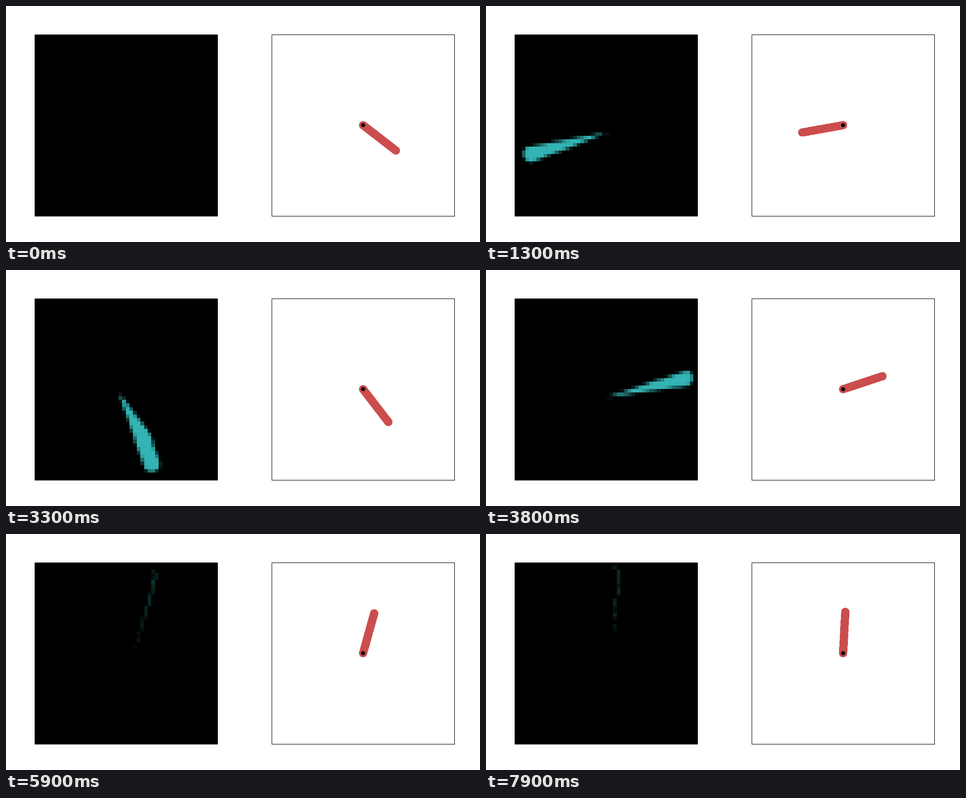
Write an HTML page with a canvas that moves like this. It is 960 by 480 pixels and loops after 8000 ms.

```html
<!DOCTYPE html>
<html lang="en">
<head>
<meta charset="utf-8">
<title>Pendulum swing-up</title>
<style>
html, body { margin: 0; width: 100%; height: 100%; overflow: hidden; background: #fff; }
canvas { display: block; }
</style>
</head>
<body>
<canvas id="stage" width="960" height="480"></canvas>
<script>
const ctx = document.getElementById('stage').getContext('2d');

const STEP = 100, STEPS = 80;
const SIZE = 260;              // simulated view, cropped around the pivot
const UNIT = 500 / 4.4;        // rod length in view pixels
const RADIUS = UNIT * 0.1;
const CELLS = 50, CELL = 7.392, SUB = 5;
const PANEL = CELLS * CELL, TOP = 57.6;
const LEFT = 58.4, RIGHT = 538.4;
const ZOOM = PANEL / 500;

// step, angle from upright (counter-clockwise degrees), degrees per step
const KEYS = [
  [0, 232.2, -0.6], [4, 213.3, -9], [8, 164.7, -14], [13, 100.2, -10.4],
  [17, 70.2, -4.4], [21, 65.8, 2.4], [25, 90.3, 9.9], [29, 145, 17],
  [33, 217.5, 18.4], [36, 265.5, 13.3], [40, 304.8, 6.9], [45, 327.5, 2.8],
  [54, 340.3, 0.95], [63, 347.2, 0.62], [79, 356.95, 0.5]
];

function angleAt(step) {
  let k = 0;
  while (k < KEYS.length - 2 && step >= KEYS[k + 1][0]) k++;
  const [s0, a0, v0] = KEYS[k], [s1, a1, v1] = KEYS[k + 1];
  const d = s1 - s0, t = (step - s0) / d, r = 1 - t;
  const deg = a0 * r * r * (1 + 2 * t) + a1 * t * t * (3 - 2 * t)
    + d * (v0 * t * r * r - v1 * t * t * r);
  return deg * Math.PI / 180;
}

// Hard-edged mask of the rod, one byte per view pixel
function rodMask(angle) {
  const mask = new Uint8Array(SIZE * SIZE);
  const ux = -Math.sin(angle), uy = -Math.cos(angle), half = SIZE / 2;
  for (let y = 0; y < SIZE; y++) {
    for (let x = 0; x < SIZE; x++) {
      const px = x + 0.5 - half, py = y + 0.5 - half;
      const along = Math.min(UNIT, Math.max(0, px * ux + py * uy));
      const dx = px - along * ux, dy = py - along * uy;
      if (dx * dx + dy * dy <= RADIUS * RADIUS) mask[y * SIZE + x] = 1;
    }
  }
  return mask;
}

const view = document.createElement('canvas');
view.width = view.height = SIZE;
const viewCtx = view.getContext('2d');

function drawDifference(before, now) {
  ctx.fillStyle = '#000';
  ctx.fillRect(58, 58, 371, 370);
  if (!before) return;
  for (let row = 0; row < CELLS; row++) {
    for (let col = 0; col < CELLS; col++) {
      let sum = 0;
      for (let j = 0; j < SUB; j++) {
        const base = (row * SUB + j) * SIZE * 1;
        for (let i = 0; i < SUB; i++) sum += sample(before, now, row, col, i, j);
      }
      if (sum <= 0) continue;
      const c = sum / (SUB * SUB);
      const x0 = Math.floor(LEFT + col * CELL), x1 = Math.floor(LEFT + (col + 1) * CELL);
      const y0 = Math.floor(TOP + row * CELL), y1 = Math.floor(TOP + (row + 1) * CELL);
      ctx.fillStyle = `rgb(${Math.round(51 * c)},${Math.round(179 * c)},${Math.round(179 * c)})`;
      ctx.fillRect(x0, y0, x1 - x0, y1 - y0);
    }
  }
}

function sample(before, now, row, col, i, j) {
  const pitch = SIZE / CELLS;
  const x = Math.floor((col + (i + 0.5) / SUB) * pitch);
  const y = Math.floor((row + (j + 0.5) / SUB) * pitch);
  const at = y * SIZE + x;
  return before[at] && !now[at] ? 1 : 0;
}

function drawPendulum(mask) {
  const img = viewCtx.createImageData(SIZE, SIZE);
  mask.forEach((on, i) => { if (on) img.data.set([204, 77, 77, 255], i * 4); });
  viewCtx.putImageData(img, 0, 0);

  const cx = RIGHT + PANEL / 2, cy = TOP + PANEL / 2, w = SIZE * ZOOM;
  ctx.drawImage(view, cx - w / 2, cy - w / 2, w, w);
  ctx.fillStyle = '#000';
  ctx.beginPath();
  ctx.arc(cx, cy, UNIT * 0.05 * ZOOM, 0, 2 * Math.PI);
  ctx.fill();
  ctx.strokeStyle = '#000';
  ctx.lineWidth = 1;
  ctx.strokeRect(538.5, 58.5, 370, 369);
}

let shown = -1;

function tick() {
  const step = Math.floor(performance.now() / STEP) % STEPS;
  if (step !== shown) {
    shown = step;
    const now = rodMask(angleAt(step));
    const before = step ? rodMask(angleAt(step - 1)) : null;
    ctx.fillStyle = '#fff';
    ctx.fillRect(0, 0, 960, 480);
    drawDifference(before, now);
    drawPendulum(now);
  }
  requestAnimationFrame(tick);
}
tick();
</script>
</body>
</html>
```
